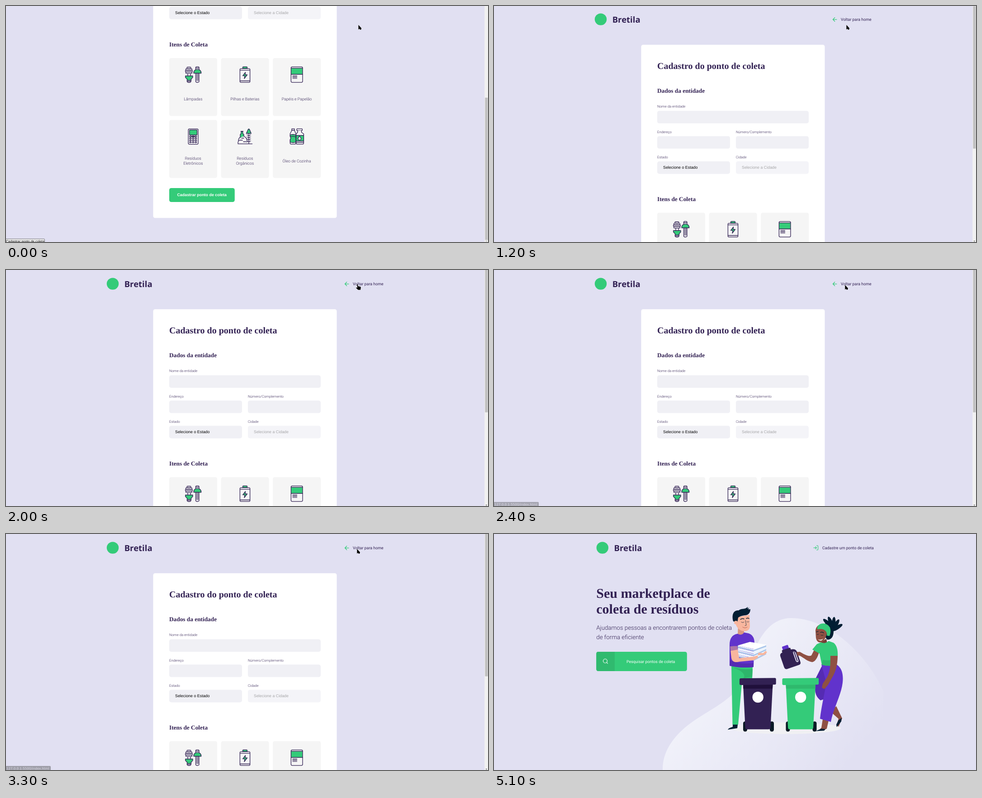
Recreate the animation shown at these times as an HTML page. Size 1066x525 px, loop 5.2 s.

```html
<!DOCTYPE html>
<html lang="pt-BR">
<head>
<meta charset="utf-8">
<title>Pontos de coleta</title>
<style>
html, body { margin: 0; width: 100%; height: 100%; overflow: hidden; background: #e1e0f2; }
svg { display: block; width: 100%; height: 100%; text-rendering: geometricPrecision; }
.serif { font-family: "Liberation Serif", serif; font-weight: 700; }
.sans { font-family: "Liberation Sans", sans-serif; }
.roboto { font-family: Roboto, sans-serif; }
.light { font-family: Roboto, sans-serif; font-weight: 300; }
.brand { font-family: "Noto Sans", sans-serif; font-weight: 700; }
.status { font-family: "DejaVu Sans", sans-serif; }
.icon { fill: none; stroke: #322153; stroke-width: 1.3; stroke-linejoin: round; stroke-linecap: round; }
.icon .g { fill: #34cb79; }
.icon .n { stroke: none; }
.line { fill: none; stroke: #34cb79; stroke-width: 2; stroke-linecap: round; stroke-linejoin: round; }
</style>
</head>
<body>
<svg id="stage" viewBox="0 0 1066 525" preserveAspectRatio="none"></svg>
<script>
const INK = '#322153', GREEN = '#34cb79', PURPLE = '#6133cc', DARK = '#021e33';
const SKIN = '#f8b69e', BROWN = '#8f5043', BOTTOM = 345;

const path = (d, fill, more = '') => `<path d="${d}" ${fill ? `fill="${fill}"` : ''} ${more}/>`;
const stroke = (d, color, w) => path(d, 'none', `stroke="${color}" stroke-width="${w}" stroke-linecap="round"`);
const rect = (x, y, w, h, r, fill, more = '') =>
  `<rect x="${x}" y="${y}" width="${w}" height="${h}" rx="${r}" ${fill ? `fill="${fill}"` : ''} ${more}/>`;
const circle = (x, y, r, fill) => `<circle cx="${x}" cy="${y}" r="${r}" fill="${fill}"/>`;
const text = (x, y, s, size, cls, fill = INK, more = '') =>
  `<text x="${x}" y="${y}" font-size="${size}" class="${cls}" fill="${fill}" ${more}>${s}</text>`;
const centred = (x, y, s, size, cls, fill, more = '') => text(x, y, s, size, cls, fill, 'text-anchor="middle" ' + more);
const group = (body, more = '') => `<g ${more}>${body}</g>`;

const brand = x => circle(x + 14, 30.6, 13.2, GREEN) + text(x + 39.7, 37.6, 'Bretila', 18.5, 'brand');

// Item icons, laid out for the page scrolled to its end
function lamps() {
  let s = '';
  [[400, 136, 9], [397.5, 139.3, 14], [396.5, 143, 16], [397.5, 146.7, 14]].forEach(([x, y, w]) => {
    s += rect(x, y, w, 3.5, 1.7);
  });
  return s + path('M402 150.3V155.5M408 150.3V155.5M400.5 165.5V168.5L402.5 170H407L409 168.5V165.5M401 167.6H408.5') +
    path('M396.8 155.5H413V159L409.5 162.5V165.5H400.5V162.5L396.8 159Z', '', 'class="g"') +
    path('M419.5 141V137.5Q419.5 135.2 421.5 135.2H425Q427 135.2 427 137.5V141M419.5 138H427') +
    path('M415 149.5C415 144 418 141.2 423.3 141.2S431.7 144 431.7 149.5Z', '', 'class="g"') +
    path('M419.5 149.8V167.2Q419.5 170 423.3 170T427 167.2V149.8M422 150V166M424.7 150V166');
}
function battery() {
  return path('M523.5 139V136.7Q523.5 135.2 525 135.2H532Q533.5 135.2 533.5 136.7V139Z', '', 'class="g"') +
    rect(517.4, 139.3, 22.2, 30.5, 2) + path('M517.5 142.8H539.5M517.5 166.5H539.5') +
    path('M529.5 147.3L523.6 155.2H528L527 161.7L533.5 153H529Z', '', 'class="g"');
}
function paper() {
  return rect(630.6, 138.5, 25.2, 13.4, 0, GREEN, 'class="n"') + rect(630.4, 135.3, 25.6, 34.5, 2.5) +
    path('M630.5 138.3H656M630.5 152H656M634 155.3H643.5M634 158H643.5M634 160.8H643.5');
}
function terminal() {
  let s = rect(403.2, 273.3, 21.8, 34.3, 2.5) + rect(405.7, 275.7, 16.8, 11.3, 1, '', 'class="g"') +
    path('M410.5 290.4H417.5', '', 'stroke-width="2.4"');
  for (let r = 0; r < 4; r++) for (let c = 0; c < 3; c++)
    s += rect(406 + c * 6, 289.2 + r * 4.3, 3.6, 2.3, .8);
  return s;
}
function organic() {
  return path('M513 306.7H544.5M513.2 306V302.5Q514 299.5 517 298.5M514 300Q514 293 521 289.5Q527 288.5 530.5 293T533 303') +
    path('M518 293V286L520 283.5V279H523.7V283.5L526 286V289.5', '', 'class="g"') +
    path('M519.3 278.7H524.5M517 298.5H523M521 294H526M525 302H531') +
    path('M531.5 283.5L535 275.5Q537 271.5 539 275.5L542.3 283.5Z', '', 'class="g"') +
    path('M537 284V306.5M533 286.5L537 289L541 286.5M533 291L537 293.5L541 291M533 295.5L537 298L541 295.5M533 300L537 302.5L541 300');
}
function oil() {
  return path('M632 273.2H638V277L641 284V305Q641 307.4 638.5 307.4H631Q628.4 307.4 628.4 305V298L630 294L628.4 289V284L632 277Z') +
    path('M628.4 287Q634.5 284.5 641 287V303Q635 305 628.4 303V297L630 294L628.4 290Z', '', 'class="g"') +
    path('M632 276.5H638M629 291Q635 288.5 641 291.5') +
    rect(643, 273.2, 12.3, 4, 1) +
    path('M645 277.2V281L641.6 284.5V304.5Q641.6 307.4 644 307.4H656Q658.4 307.4 658.4 304.5V284.5L653.5 281V277.2', '#f5f5f5') +
    path('M641.6 288H658.4V300.5H641.6Z', '', 'class="g"') +
    path('M649.2 289.5Q646 293.3 646 295A3.2 3.2 0 0 0 652.4 295Q652.4 293.3 649.2 289.5Z', '#fff') +
    path('M641.6 303.5H658.4');
}

function formPage() {
  const input = (x, y, w, fill = '#f0f0f5') => rect(x, y, w, 27.8, 4.4, fill);
  const label = (x, y, s) => text(x, y, s, 7.77, 'light');
  let s = brand(222) +
    group('<path class="line" d="M19 12H5M12 19L5 12L12 5"/>', 'transform="translate(746.4 23.7) scale(.61)"') +
    text(767, 34.2, 'Voltar para home', 8.88, 'roboto') +
    rect(325.5, 87.3, 406, 729.3, 4.4, '#fff') +
    text(361, 141.2, 'Cadastro do ponto de coleta', 20, 'serif') +
    text(361, 193.5, 'Dados da entidade', 13.32, 'serif') +
    label(361, 227.4, 'Nome da entidade') + input(361, 234.3, 335) +
    label(361, 283.6, 'Endereço') + input(361, 290.4, 161) +
    label(535, 283.6, 'Número/Complemento') + input(535, 290.4, 161) +
    label(361, 339.8, 'Estado') + input(361, 346.6, 161) +
    label(535, 339.8, 'Cidade') + input(535, 346.6, 161, '#f4f4f8') +
    text(374, 363.3, 'Selecione o Estado', 8.88, 'sans', '#000') +
    text(548, 363.3, 'Selecione a Cidade', 8.88, 'sans', '#a6a6a8') +
    text(361, 435, 'Itens de Coleta', 13.32, 'serif');
  const items = [
    [lamps, 'Lâmpadas'], [battery, 'Pilhas e Baterias'], [paper, 'Papéis e Papelão'],
    [terminal, 'Resíduos', 'Eletrônicos'], [organic, 'Resíduos', 'Orgânicos'], [oil, 'Óleo de Cozinha']
  ];
  let low = '';
  items.forEach(([icon, ...lines], i) => {
    const x = 361 + i % 3 * 114.6, y = i < 3 ? 115.8 : 253.5;
    low += rect(x, y, 106, 129, 4.4, '#f5f5f5') + group(icon(), 'class="icon"');
    lines.forEach((line, k) => {
      low += centred(x + 52.8, y + 94.1 + (k - (lines.length - 1) / 2) * 11.6, line, 8.88, 'light');
    });
  });
  low += rect(361, 405, 144.8, 31, 4.4, GREEN) +
    centred(433.2, 423.4, 'Cadastrar ponto de coleta', 8.88, 'sans', '#fff', 'font-weight="700"') +
    rect(-2, 518.2, 87.3, 11, 1, '#efefef', 'stroke="#555" stroke-width=".8"') +
    text(-.3, 525.6, 'Cadastrar ponto de coleta', 7.4, 'sans', '#000');
  return s + group(low, `transform="translate(0 ${BOTTOM})"`);
}

function bin(x, color, shade) {
  const wheel = dx => rect(x + dx, 417, 9, 22.5, 4.2, '#0a1a26');
  return wheel(8) + wheel(67) +
    path(`M${x + 8} 335H${x + 73.5}L${x + 68.5} 431Q${x + 68} 434.5 ${x + 64} 434.5H${x + 17}Q${x + 13} 434.5 ${x + 12.7} 431Z`, color) +
    path(`M${x + 8} 335H${x + 73.5}L${x + 73} 344H${x + 8.5}Z`, shade) +
    path(`M${x + 3} 321L${x + 78} 320.2Q${x + 80.7} 320.2 ${x + 80.7} 323V332.5Q${x + 80.7} 335 ${x + 78} 335L${x + 3} 336Q${x} 336 ${x} 333V324Q${x} 321 ${x + 3} 321Z`, color) +
    circle(x + 40.7, 363, 12.2, '#fff');
}

function woman() {
  let s = '';
  [-48, -22, 5, 30, 58].forEach(a => {
    s += `<ellipse cx="750" cy="198" rx="4.2" ry="14" fill="${DARK}" transform="rotate(${a} 745 211)"/>`;
  });
  s += path('M727 203C737 193 752 201 751 217C751 229 745 236 737 235L730 226Z', DARK) +
    path('M757 383L770 410L762 429L758 424L762 411L744 395Z', BROWN) +
    path('M769 409L768 417L758 429.5L757 424L762 414Z', DARK) +
    path('M727 412L740 415L736 433L728 437L717 438L724 431Z', BROWN) +
    path('M711 438.5L724 433L733 434L730 437.5Z', DARK) +
    path('M726 292L744 300L735 366L722 370C713 363 710 354 710 345L711 322Z', '#552bb3') +
    path('M724 290H757C770 298 773 313 771 331C768 358 751 386 745 418L721 411C724 384 731 355 735 331Z', PURPLE) +
    path('M735 233L738 249L726 251L721 242Z', '#753c34') +
    path('M711 214C713 202 724 198 733 206C739 214 736 229 729 237C722 244 714 242 712 231Z', BROWN) +
    path('M715 208C719 196 736 196 743 208Q746 217 742 227L736 226C738 215 728 209 715 212Z', GREEN) +
    stroke('M714 223q2 2 4 0M723 225q3 1.5 5 0', DARK, .8) + stroke('M713 218l4-1.5M722 219q4-2 7 1', DARK, 1.2) +
    path('M716 234Q722 237 728 233Q723 241 716 234Z', '#fff') +
    path('M709 256L702 270C696 274 685 267 676 262L671 264L675 270C686 276 694 284 704 285C713 283 717 270 720 260Z', BROWN) +
    path('M714 245L723 241Q732 245 740 238L751 242C758 247 761 258 760 273L755 292Q741 295 725 291L720 266L704 257Z', GREEN) +
    path('M727 280Q742 283 752 278L755 292Q741 295 725 291Z', '#2eb66b') +
    path('M744 271H760C760 292 755 308 748 319L739 335L731 345L725 342L727 333L737 318C745 302 744 286 744 271Z', BROWN);
  return s;
}

function jug() {
  return group(
    rect(-9, -27.5, 14, 9, 1.5, PURPLE) + rect(-12, -20, 20, 9, 2, INK) +
    path('M-19 -8Q-19 -14 -13 -15H10Q18 -14 19 -7V17Q19 23 13 23H-13Q-19 23 -19 17Z', INK) +
    path('M11 -9Q16 -9 16 -3V12Q16 16 13 16Q10 16 10 12V-6Z', '#ecebf6') +
    stroke('M13 -7V13', '#4c3b70', 2.5), 'transform="translate(654 274) rotate(-19)"') +
    path('M669 262L678 263L678 270L671 271Z', BROWN);
}

function man() {
  let s = path('M525 293L572 295L571 323H549L540 424H527.5Z', GREEN) +
    path('M526 296Q549 303 572 300L571 318Q561 318 551 322Q562 309 526 296Z', '#2eb66b') +
    path('M528 424H539L538 432Q526 434 517 435.3Q518 432 528 429Z', DARK) +
    path('M538 222C527 224 521 232 521 247V293Q546 299 574 296L576 242C576 230 571 224 563 221L553 219Z', PURPLE) +
    path('M522 280Q544 291 574 287V296Q546 299 521 293Z', '#552bb3') +
    path('M540 204H553V219Q548 227 539 222Z', '#d99680') +
    path('M537 185L565 180L566 205C566 213 560 217 552 216C543 215 538 209 535 202Z', SKIN) +
    path('M529 194C525 179 530 169 541 170C548 164 556 169 561 162L561 167L564 163L563 168L567 167C567 177 561 181 554 181Q545 182 540 186L538 198Z', DARK) +
    circle(535, 197, 4, SKIN) +
    stroke('M547 196q3 2.5 6 0M559 195q2.5 2 5 0M556 192l2 11l-3 1', DARK, .7) +
    stroke('M545 190q4-3 8-1M558 188q3-2 6 0', DARK, 1.5) + stroke('M550 207q5 4 10 0', '#b95f50', 1);
  for (let i = 4; i >= 0; i--) {
    const y = i * 5.2;
    s += path(`M539 ${249 + y}L575 ${257 + y}L602 ${247 + y * .8}V${251 + y * .8}L575 ${261 + y}L539 ${253 + y}Z`, i % 2 ? '#e9f3fd' : '#adc8eb') +
      stroke(`M540 ${249 + y}L574 ${257 + y}L601 ${247 + y * .8}`, '#fff', 1.5);
  }
  return s + path('M539 248L566 240L602 246.5L575 256Z', '#fff') +
    path('M522 250L525 276C527 286 535 286 543 284L574 281L584 275L583 270L573 273L542 276L538 249Z', SKIN) +
    path('M583 270L598 269L604 263L601 260L595 265L585 264Z', SKIN) +
    path('M521 247Q528 252 538 247L540 257L523 260Z', '#552bb3', 'opacity=".45"');
}

function homePage() {
  const button = rect(226.3, 262, 200.5, 43, 4.4, GREEN) +
    path('M267 262V305H230.7Q226.3 305 226.3 300.6V266.4Q226.3 262 230.7 262Z', '#30ba6f') +
    `<g class="line" style="stroke:#fff" transform="translate(239.8 276.4) scale(.555)"><circle cx="11" cy="11" r="8"/><path d="M21 21L16.7 16.7"/></g>` +
    centred(346.7, 286.8, 'Pesquisar pontos de coleta', 8.88, 'roboto', '#fff');
  return rect(0, 0, 1066, 525, 0, '#e1e0f2') +
    path('M373 525C372 480 403 443 440 417C491 381 544 363 562 300C577 246 603 187 657 187C745 188 825 270 861 349V525Z', 'url(#glow)') +
    `<ellipse cx="645" cy="432" rx="122" ry="13" fill="#f0f0f3"/>` +
    brand(225.8) +
    group('<path class="line" d="M15 3H19A2 2 0 0 1 21 5V19A2 2 0 0 1 19 21H15M10 17L15 12L10 7M15 12H3"/>', 'transform="translate(705.4 24.2) scale(.535)"') +
    text(726, 34.2, 'Cadastre um ponto de coleta', 8.88, 'roboto') +
    woman() + jug() + man() + bin(543, INK, '#20103b') + bin(637.5, GREEN, '#2fb96d') +
    text(226.3, 142.3, 'Seu marketplace de', 30, 'serif') +
    text(226.3, 176.8, 'coleta de resíduos', 30, 'serif') +
    text(226.3, 213, 'Ajudamos pessoas a encontrarem pontos de coleta', 13.32, 'light') +
    text(226.3, 234, 'de forma eficiente', 13.32, 'light') + button;
}

const arrow = path('M0 0V10.6L2.5 8.6L3.6 10.7L6 10.4L6.6 7.2Z', '#000', 'stroke="#fff" stroke-width=".8" paint-order="stroke"');
const hand = path('M-.9 .8Q0 -.6 1 .8L1.6 4.2L6.6 5.4Q8 5.9 7.7 7.5L7 12.6H1.8L-2.8 8.2Q-2.7 6.8 -1.2 7.2L.2 8Z', '#000', 'stroke="#fff" stroke-width=".8" paint-order="stroke"');

const stage = document.getElementById('stage');
stage.innerHTML = `<defs><linearGradient id="glow" gradientUnits="userSpaceOnUse" x1="470" y1="270" x2="780" y2="520">
  <stop offset="0" stop-color="#f3f4fb"/><stop offset="1" stop-color="#e1e0f2"/></linearGradient></defs>` +
  rect(0, 0, 1066, 525, 0, '#e1e0f2') +
  group(formPage(), 'id="form"') +
  rect(1058.3, 0, 7.7, 525, 0, '#f1f1f1') +
  rect(1059.4, 0, 6.1, 316.6, 0, '#c1c1c1', 'id="thumb"') +
  path('M1060.6 522.3H1064.2L1062.4 524.3Z', '#505050', 'id="down"') +
  group(path('M0 516H97Q99 516 99 518V525H0Z', '#3c3c3c') +
    text(1, 524, '127.0.0.1:5500/index.html', 7.1, 'status', '#d8d8d8'), 'id="status"') +
  group(arrow, 'id="arrow"') + group(hand, 'id="hand"') + group(homePage(), 'id="home"');

const $ = id => document.getElementById(id);
const show = (id, on) => $(id).setAttribute('visibility', on ? 'visible' : 'hidden');
const move = (id, x, y) => $(id).setAttribute('transform', `translate(${x} ${y})`);
// Value of the last [time, value] pair reached
const step = (t, pairs) => pairs.reduce((v, [at, next]) => t >= at ? next : v, 0);

function draw(t) {
  const scroll = step(t, [[0, BOTTOM], [1100, 7.8], [1200, 1], [1300, 0]]);
  move('form', 0, -scroll);
  move('thumb', 0, scroll * .591);
  $('down').setAttribute('fill', scroll === BOTTOM ? '#a3a3a3' : '#505050');
  $('status').setAttribute('opacity', step(t, [[2400, .35], [2500, .7], [2600, 1], [3300, .4], [3400, 0]]));
  const pointing = t >= 2000 && t < 2400;
  show('hand', pointing);
  show('arrow', !pointing);
  move('hand', t < 2100 ? 777 : 776.5, 31.7);
  if (t < 2000) move('arrow', 779.4, 42); else move('arrow', 776.3, 33.2);
  show('home', t >= 5100);
}

let start;
function tick(now) {
  start ??= now;
  draw((now - start) % 5200);
  requestAnimationFrame(tick);
}
draw(0);
requestAnimationFrame(tick);
</script>
</body>
</html>
```
